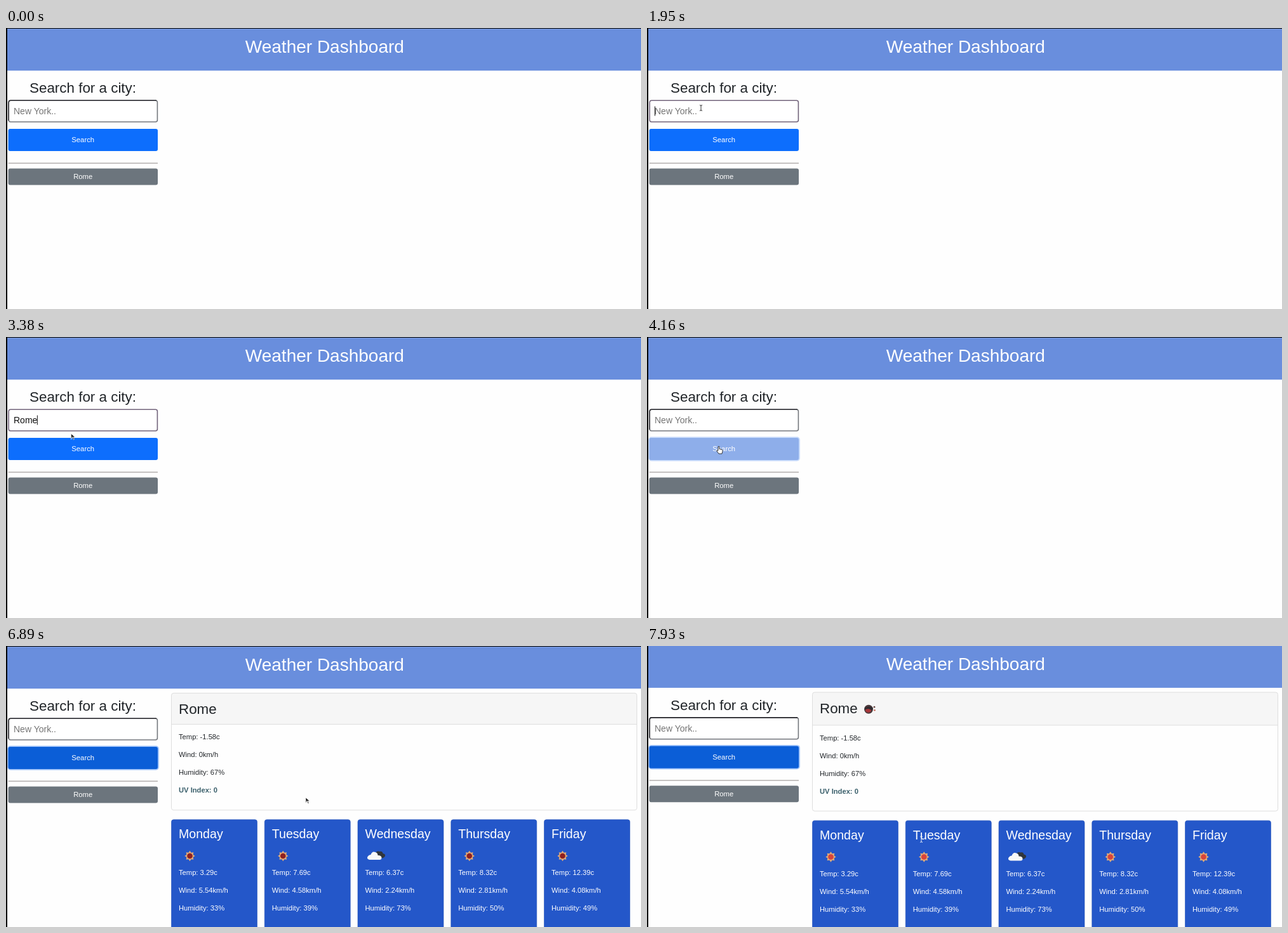
Recreate the animation shown at these times as an HTML page. Size 1000 px wide and 443 px high, loop 8 s.

```html
<!DOCTYPE html>
<html lang="en">
<head>
<meta charset="utf-8">
<title>Weather Dashboard</title>
<style>
  html, body { margin: 0; width: 100%; height: 100%; overflow: hidden; background: #fefefe; }
  svg { display: block; width: 100vw; height: 100vh; }
  text { font-family: "Liberation Sans", Arial, sans-serif; fill: #212529; white-space: pre; }
</style>
</head>
<body>
<svg id="stage" viewBox="0 0 1000 443"></svg>
<script>
const LOOP = 8000, STEP = 130;
const stage = document.getElementById('stage');

const text = (x, y, size, str, fill = '#212529', extra = '') =>
  `<text x="${x}" y="${y}" font-size="${size}" fill="${fill}" style="fill:${fill}" ${extra}>${str}</text>`;
const rect = (x, y, w, h, fill, r = 0, extra = '') =>
  `<rect x="${x}" y="${y}" width="${w}" height="${h}" rx="${r}" fill="${fill}" ${extra}/>`;
const lines = (x, y, list, fill) =>
  list.map((s, i) => text(x, y + 28 * i, 11.2, s, fill)).join('');

function sun(x, y) {
  const pts = Array.from({ length: 16 }, (_, i) => {
    const a = i * Math.PI / 8, r = i % 2 ? 5.6 : 8.2;
    return (x + r * Math.sin(a)).toFixed(1) + ',' + (y - r * Math.cos(a)).toFixed(1);
  });
  return `<polygon points="${pts.join(' ')}" fill="#dfa878"/>` +
    `<circle class="core" cx="${x}" cy="${y}" r="4.3"/>`;
}

const cloud = (x, y) => `<g transform="translate(${x} ${y})">
  <path d="M-1-4Q1-9 6-7Q10-8 11-4Q16-3 14 1Q12 4 7 3L0 1Z" fill="#30363c"/>
  <path d="M-10 6Q-15 5-13 1Q-11-2-8-2Q-6-8-1-6Q3-5 3-1Q9-1 9 3Q9 6 6 6Z" fill="#f8f8f8"/></g>`;

const days = [
  ['Monday', '3.29', '5.54', 33],
  ['Tuesday', '7.69', '4.58', 39],
  ['Wednesday', '6.37', '2.24', 73],
  ['Thursday', '8.32', '2.81', 50],
  ['Friday', '12.39', '4.08', 49]
];

const dayCard = ([name, temp, wind, hum], i) => {
  const x = 260.5 + 146.75 * i, tx = x + 11.5;
  return rect(x, 273.7, 135, 180, '#2457c9', 3.5, 'stroke="#2050b8" stroke-width=".6"') +
    text(tx, 303, 19.6, name, '#fff') +
    (i === 2 ? cloud(x + 28.5, 331) : sun(x + 29, 331)) +
    lines(tx, 361, [`Temp: ${temp}c`, `Wind: ${wind}km/h`, `Humidity: ${hum}%`], '#fff');
};

stage.innerHTML = rect(0, 0, 1000, 443, '#fefefe') + `
<g id="top">
  ${rect(0, 0, 1000, 1.2, '#000')}
  ${rect(2, 1.2, 998, 66, '#698edd')}
  ${text(376.8, 39, 28, 'Weather Dashboard', '#fff')}
  ${text(37, 102, 22.4, 'Search for a city:')}
  ${rect(4.2, 114.2, 234.2, 33.8, '#fff', 3, 'id="field" stroke-width="1.6"')}
  <path id="bevel" d="M4.2 146V117.2Q4.2 114.2 7.2 114.2H237" fill="none" stroke="#2b2b30" stroke-width="1.6"/>
  ${text(12, 136, 14, '', '#757575', 'id="entry"')}
  ${rect(0, 123.5, 1, 15, '#111', 0, 'id="caret"')}
  ${rect(2.2, 157.2, 238.8, 38.6, '#b9d2fb', 5, 'id="ring"')}
  ${rect(3.5, 159, 235.5, 35, '#0d6efd', 3, 'id="button"')}
  ${text(121.2, 180, 11.3, 'Search', '#fff', 'text-anchor="middle"')}
  ${rect(3.5, 212.4, 235.5, 1.5, '#b4b0ae')}
  ${rect(3.5, 221.5, 235.5, 26, '#6c757d', 3)}
  ${text(121.2, 238, 11.3, 'Rome', '#fff', 'text-anchor="middle"')}
</g>
<g id="results">
  ${rect(260.5, 74.3, 733, 184.4, '#fefefe', 3.5, 'id="box"')}
  <path id="boxHead" fill="#f6f6f6"/>
  <path id="boxRule" stroke="#dedede"/>
  ${rect(260.5, 74.3, 733, 184.4, 'none', 3.5, 'id="boxEdge" stroke="#dedede"')}
  <g id="title">${text(272, 107, 22.4, 'Rome')}
    <g id="nowIcon"><circle cx="349" cy="101" r="7" fill="#4a3a3c"/>
      <circle cx="348.5" cy="101.5" r="4.8" fill="#a8363a"/>
      <path d="M343 99Q349 94 356 99L354 103Q349 98 343 102Z" fill="#302c30"/>
      <circle cx="358" cy="97.5" r="1.4" fill="#6b4a48"/><circle cx="358.5" cy="102.5" r="1.3" fill="#c96a5c"/></g>
  </g>
  <g id="body">
    ${lines(272, 147, ['Temp: -1.58c', 'Wind: 0km/h', 'Humidity: 67%'])}
    ${text(272, 231, 11.2, 'UV Index: 0', '#3a5f6b', 'font-weight="bold"')}
    ${days.map(dayCard).join('')}
  </g>
</g>
${rect(0, 0, 2, 443, '#000')}
<g id="cursor">
  <path id="beam" d="M-2-4.5Q0-4.5 0-3Q0-4.5 2-4.5M0-3V3M-2 4.5Q0 4.5 0 3Q0 4.5 2 4.5" fill="none" stroke="#333"/>
  <path id="arrow" d="M0-5V4L2-.1 3.6 4.5 5 3.8 3.4.4H6Z" fill="#111" stroke="#fff" stroke-width=".6"/>
  <path id="hand" d="M-2-5Q-1-6.5 0-5V-1.5L4-.5Q5.5 0 5 2L4 6H-1L-4 2Q-5 0-2 1Z" fill="#fff" stroke="#222" stroke-width=".9"/>
</g>`;

const el = {};
stage.querySelectorAll('[id]').forEach(n => el[n.id] = n);
const cores = stage.querySelectorAll('.core');
const set = (n, attrs) => { for (const k in attrs) n.setAttribute(k, attrs[k]); };
const show = (n, on) => n.setAttribute('visibility', on ? 'inherit' : 'hidden');
const moveY = (n, y) => n.setAttribute('transform', `translate(0 ${y})`);

// time, x, y; two equal places make a pause
const path = [
  [390, 150, 205], [780, 85, 126], [2860, 85, 126], [3770, 114, 178], [6370, 114, 178],
  [6890, 472, 244], [7150, 446, 290], [7280, 446, 290], [7410, 433, 303],
  [7670, 433, 303], [7800, 432, 305], [8000, 432, 305]
];

function place(t) {
  const i = Math.max(1, path.findIndex(p => p[0] >= t));
  const [t0, x0, y0] = path[i - 1], [t1, x1, y1] = path[i];
  let k = Math.min(1, Math.max(0, (t - t0) / (t1 - t0)));
  k = k * k * (3 - 2 * k);
  return [x0 + (x1 - x0) * k, y0 + (y1 - y0) * k];
}

const typed = t => t < 2080 ? '' : t < 2210 ? 'R' : t < 2470 ? 'Ro' : t < 2730 ? 'Rom' : 'Rome';

function render(now) {
  const t = Math.floor(now / STEP) * STEP;
  const focus = t >= 780 && t < 3900;
  const word = t < 4030 ? typed(t) : '';

  el.entry.textContent = word || 'New York..';
  el.entry.style.fill = word ? '#111' : '#757575';
  el.field.setAttribute('stroke', !focus ? '#74777d' : t < 1950 ? '#c47b55' : '#71637a');
  show(el.bevel, !focus);
  show(el.caret, focus && !(t >= 1430 && t < 1950));
  el.caret.setAttribute('x', word ? 12 + el.entry.getComputedTextLength() - .5 : 12);

  const [x, y] = place(t);
  const hover = t < 4030 && y > 159 && y < 194 && t > 2990;
  const busy = t >= 4030 && t < 6500;
  el.button.setAttribute('fill', busy ? (t < 4160 ? '#5f92ea' : '#8eaeea')
    : t >= 6500 || hover ? '#0b5ed7' : '#0d6efd');
  show(el.ring, t >= 3900);
  el.ring.setAttribute('fill', t < 6500 ? '#c9dcfb' : '#a2c5fb');

  show(el.cursor, (t >= 390 && t < 5980) || t >= 6500);
  el.cursor.setAttribute('transform', `translate(${x.toFixed(1)} ${y.toFixed(1)})`);
  const overField = x < 238 && y > 114 && y < 148;
  const late = t >= 7410;
  const mode = overField || late ? 'beam' : t > 2990 && x < 239 && y > 159 && y < 194 ? 'hand' : 'arrow';
  for (const m of ['beam', 'arrow', 'hand']) show(el[m], m === mode);
  el.beam.setAttribute('stroke', late ? '#dfe6f5' : '#333');

  // the loaded icon makes the heading taller and the page scrolls a little
  const grown = t >= 7800;
  const dy = grown ? 1.5 : 0, up = grown ? -1.3 : 0;
  show(el.results, t >= 5980);
  show(el.nowIcon, grown);
  moveY(el.top, up);
  moveY(el.title, up);
  moveY(el.body, dy);
  const y0 = 74.3 + up, rule = 123.4 + dy;
  for (const b of [el.box, el.boxEdge]) set(b, { y: y0, height: 258.7 + dy - y0 });
  el.boxHead.setAttribute('d', `M260.5 ${rule}V${y0 + 3.5}Q260.5 ${y0} 264 ${y0}H990Q993.5 ${y0} 993.5 ${y0 + 3.5}V${rule}Z`);
  el.boxRule.setAttribute('d', `M260.5 ${rule}H993.5`);
  const red = t < 6500 ? '#c62a20' : grown ? '#d9443a' : '#8f2020';
  cores.forEach(c => c.setAttribute('fill', red));
}

const start = performance.now();
function tick() {
  render((performance.now() - start) % LOOP);
  requestAnimationFrame(tick);
}
tick();
</script>
</body>
</html>
```
